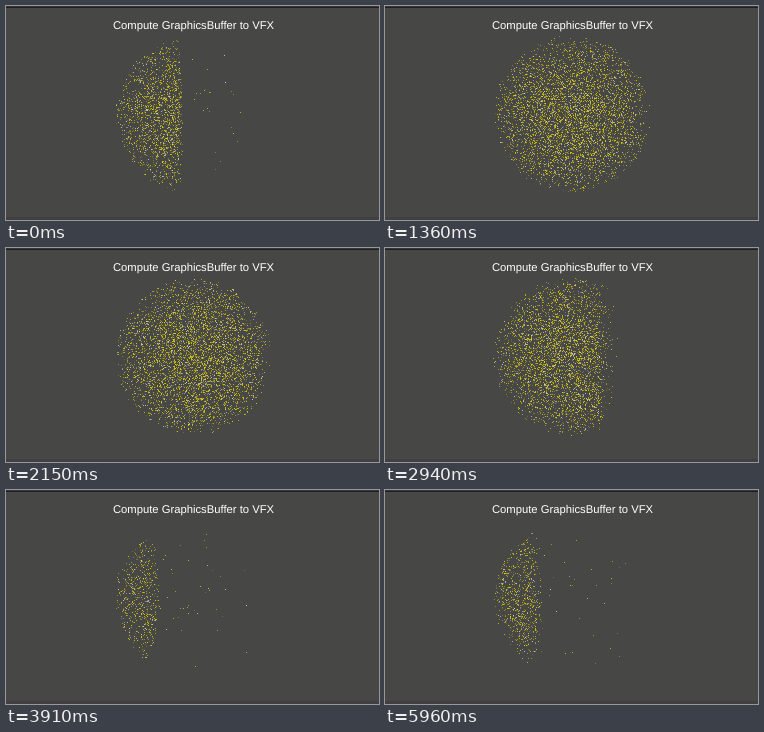
These frames come from a looping animation (373 px wide and 214 px high, 5.99 s). An HTML page with a canvas:

```html
<!DOCTYPE html>
<html lang="en">
<head>
<meta charset="utf-8">
<title>Particle sphere</title>
<style>
html, body { margin: 0; width: 100%; height: 100%; overflow: hidden; background: #474745; }
#stage { position: relative; width: 373px; height: 214px; overflow: hidden; }
canvas { position: absolute; left: 0; top: 0; }
h1 {
  position: absolute; left: 0; top: 13px; width: 375px; margin: 0;
  font: 400 11.25px/14px "Liberation Sans", Arial, sans-serif;
  text-rendering: geometricPrecision;
  text-align: center; white-space: nowrap; color: #fff;
}
</style>
</head>
<body>
<div id="stage">
  <canvas id="view" width="373" height="214"></canvas>
  <h1>Compute GraphicsBuffer to VFX</h1>
</div>
<script>
const LOOP = 5990, STEP = 46, LIFE = 500;
const COUNT = 4800, STRAY = 0.008;
const CX = 187.5, CY = 108.5, FOCAL = 74.5, CAMERA = 3;
const ctx = document.getElementById("view").getContext("2d");

// Repeatable random value in 0..1 for a particle, its generation and a channel
function rnd(id, gen, channel) {
  let h = Math.imul(id + 1, 0x9e3779b1) ^ Math.imul(gen + 7, 0x85ebca6b) ^ Math.imul(channel + 3, 0xc2b2ae35);
  h = Math.imul(h ^ (h >>> 16), 0x7feb352d);
  h = Math.imul(h ^ (h >>> 15), 0x846ca68b);
  return ((h ^ (h >>> 16)) >>> 0) / 4294967296;
}

function bar(y, height, color) {
  ctx.fillStyle = color;
  ctx.fillRect(0, y, 373, height);
}

function drawParticle(id, ms, cut) {
  const gen = Math.floor(ms / LIFE + rnd(id, 0, 0));
  const r = Math.cbrt(rnd(id, gen, 1));
  const x = r * (2 * rnd(id, gen, 2) - 1);
  const stray = x > cut;
  if (stray && rnd(id, gen, 4) > STRAY) return;

  const ring = Math.sqrt(r * r - x * x);
  const angle = rnd(id, gen, 3) * Math.PI * 2;
  const scale = FOCAL * CAMERA / (CAMERA - ring * Math.cos(angle));
  const px = CX + x * scale;
  const py = CY + ring * Math.sin(angle) * scale;
  if (stray && px > 245) return;

  ctx.globalAlpha = 0.2 + 0.65 * rnd(id, gen, 5);
  ctx.fillStyle = rnd(id, 0, 6) < 0.74 ? "#e8d800" : "#dcdcd6";
  ctx.fillRect(Math.floor(px), Math.floor(py), 1, 1);
}

function draw(ms) {
  ctx.globalAlpha = 1;
  bar(0, 214, "#474745");
  bar(0, 1, "#353535");
  bar(1, 1, "#1f1f1f");
  bar(211, 3, "#423e42");

  // The visible part lies left of a plane that swings through the sphere
  const cut = Math.sin(ms / 1000 - 0.18);
  for (let id = 0; id < COUNT; id++) drawParticle(id, ms, cut);
}

const start = performance.now();
let last = -1;
function tick() {
  const t = (performance.now() - start) % LOOP;
  const step = Math.floor(t / STEP);
  if (step !== last) {
    last = step;
    draw(step * STEP);
  }
  requestAnimationFrame(tick);
}
tick();
</script>
</body>
</html>
```
